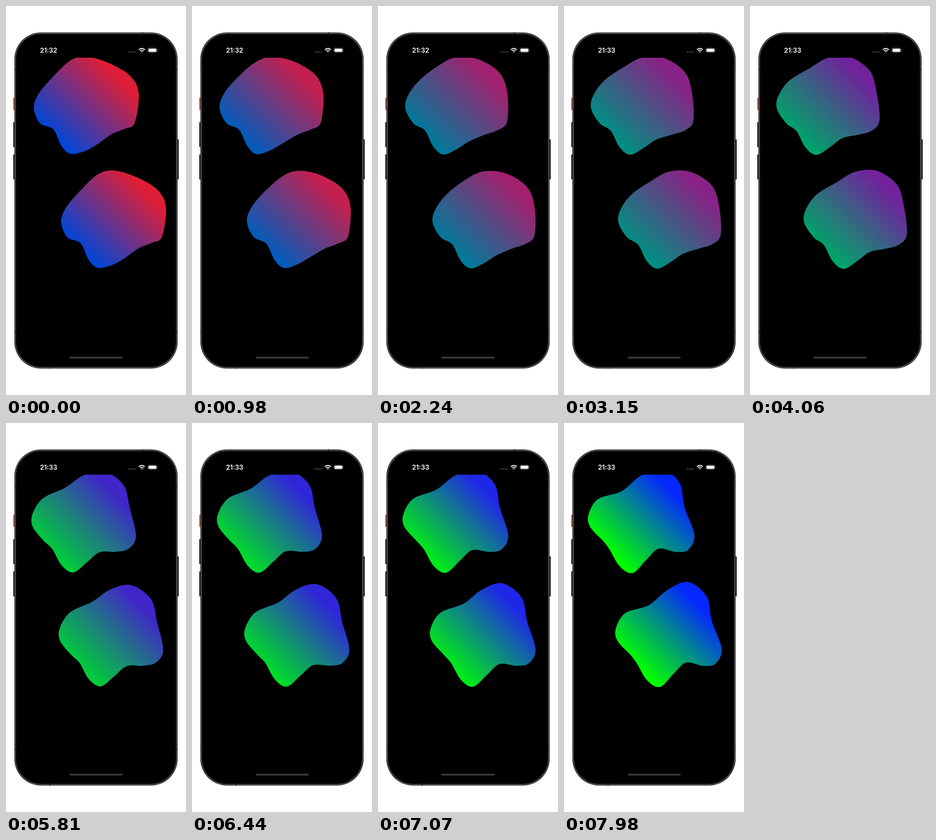
Animation, 323 px wide and 700 px high, one loop 8000 ms. Source, as an HTML page:

```html
<!DOCTYPE html>
<html lang="en">
<head>
<meta charset="utf-8">
<title>Morphing blobs</title>
<style>
  html, body { margin: 0; width: 100%; height: 100%; overflow: hidden; background: #fff; }
  svg { display: block; width: 100vw; height: 100vh; }
  text { font: 600 11.8px Inter, sans-serif; fill: #fff; }
  #low { animation: low 8s linear infinite; }
  #high { animation: high 8s linear infinite; }
  @keyframes low { from { stop-color: rgb(0, 70, 215); } to { stop-color: rgb(0, 255, 0); } }
  @keyframes high { from { stop-color: rgb(222, 30, 55); } to { stop-color: rgb(5, 40, 255); } }
</style>
</head>
<body>
<svg viewBox="0 0 323 700">
  <defs>
    <linearGradient id="fill" gradientUnits="userSpaceOnUse" x1="131" y1="436" x2="241" y2="326">
      <stop id="low" offset="0"/>
      <stop id="high" offset="1"/>
    </linearGradient>
    <clipPath id="safeArea"><rect x="19" y="93" width="285" height="556"/></clipPath>
    <path id="blob" fill="url(#fill)"/>
  </defs>

  <!-- phone body -->
  <g fill="#222">
    <rect x="13" y="165" width="3" height="22" rx="1" fill="#b9582c"/>
    <rect x="13" y="209" width="3" height="45" rx="1"/>
    <rect x="13" y="267" width="3" height="45" rx="1"/>
    <rect x="307.5" y="240" width="2.5" height="72" rx="1"/>
  </g>
  <rect x="15" y="47.5" width="293" height="605" rx="48" fill="#2e2e2e"/>
  <rect x="16.8" y="49.3" width="289.4" height="601.4" rx="46.2" fill="#000" stroke="#464646" stroke-width="2.4"/>
  <path d="M15 114h4M304 114h4M15 587h4M304 587h4M245 47.5v4M79 648.5v4" stroke="#242424" stroke-width="2"/>

  <!-- status bar -->
  <text id="clock" x="61" y="84"></text>
  <path d="M221.2 82.6h10.6" stroke="#555" stroke-width="2.4" stroke-linecap="round" stroke-dasharray="0 3.5"/>
  <g fill="none" stroke="#fff" stroke-width="1.6">
    <path d="M238.4 78.6q5.4-4.4 10.8 0"/>
    <path d="M240.4 80.8q3.4-2.7 6.8 0"/>
    <path d="M242.1 82l1.7 1.8 1.7-1.8q-1.7-1.1-3.4 0z" fill="#fff" stroke="none"/>
  </g>
  <rect x="254.4" y="75.6" width="16.8" height="8" rx="2.6" fill="none" stroke="#666" stroke-width=".8"/>
  <rect x="255.6" y="76.7" width="14.4" height="5.8" rx="1.7" fill="#fff"/>
  <path d="M272.3 78.3q1.4 1.3 0 2.6z" fill="#777"/>

  <g clip-path="url(#safeArea)">
    <use href="#blob" x="-49" y="-205"/>
    <use href="#blob"/>
  </g>
  <rect x="114" y="631" width="95.5" height="3.4" rx="1.7" fill="#363636"/>
</svg>
<script>
const LOOP = 8000, MINUTE = 2400;
const blob = document.getElementById('blob');
const clock = document.getElementById('clock');
const colours = document.getAnimations();

// Key points of the outline, clockwise from the top; each one moves in a straight line.
const START = [[192,296], [232,307], [271,330], [287,362], [280,415], [262,426], [238,436], [211,455], [188,467],
  [164,471], [148,456], [134,427], [110,416], [99,389], [107,364], [130,336], [163,304]];
const END = [[185,301], [222,286], [256,312], [265,356], [283,406], [272,433], [250,437], [219,431], [197,451],
  [172,475], [149,463], [131,433], [119,417], [96,392], [93,370], [110,342], [152,328]];

const mix = (a, b, k) => a.map((v, i) => v + (b[i] - v) * k);

// Closed Catmull-Rom spline as cubic curves.
function smoothPath(points) {
  const n = points.length;
  const at = i => points[(i + n) % n];
  const handle = (i, side) => at(i).map((v, axis) =>
    (v + side * (at(i + 1)[axis] - at(i - 1)[axis]) / 6).toFixed(2));
  return `M${points[0]}` + points.map((_, i) =>
    `C${handle(i, 1)} ${handle(i + 1, -1)} ${at(i + 1)}`).join('') + 'Z';
}

function tick() {
  const t = performance.now() % LOOP;
  colours.forEach(animation => { animation.currentTime = t; });
  blob.setAttribute('d', smoothPath(START.map((p, i) => mix(p, END[i], t / LOOP))));
  clock.textContent = t < MINUTE ? '21:32' : '21:33';
  requestAnimationFrame(tick);
}
tick();
</script>
</body>
</html>
```
